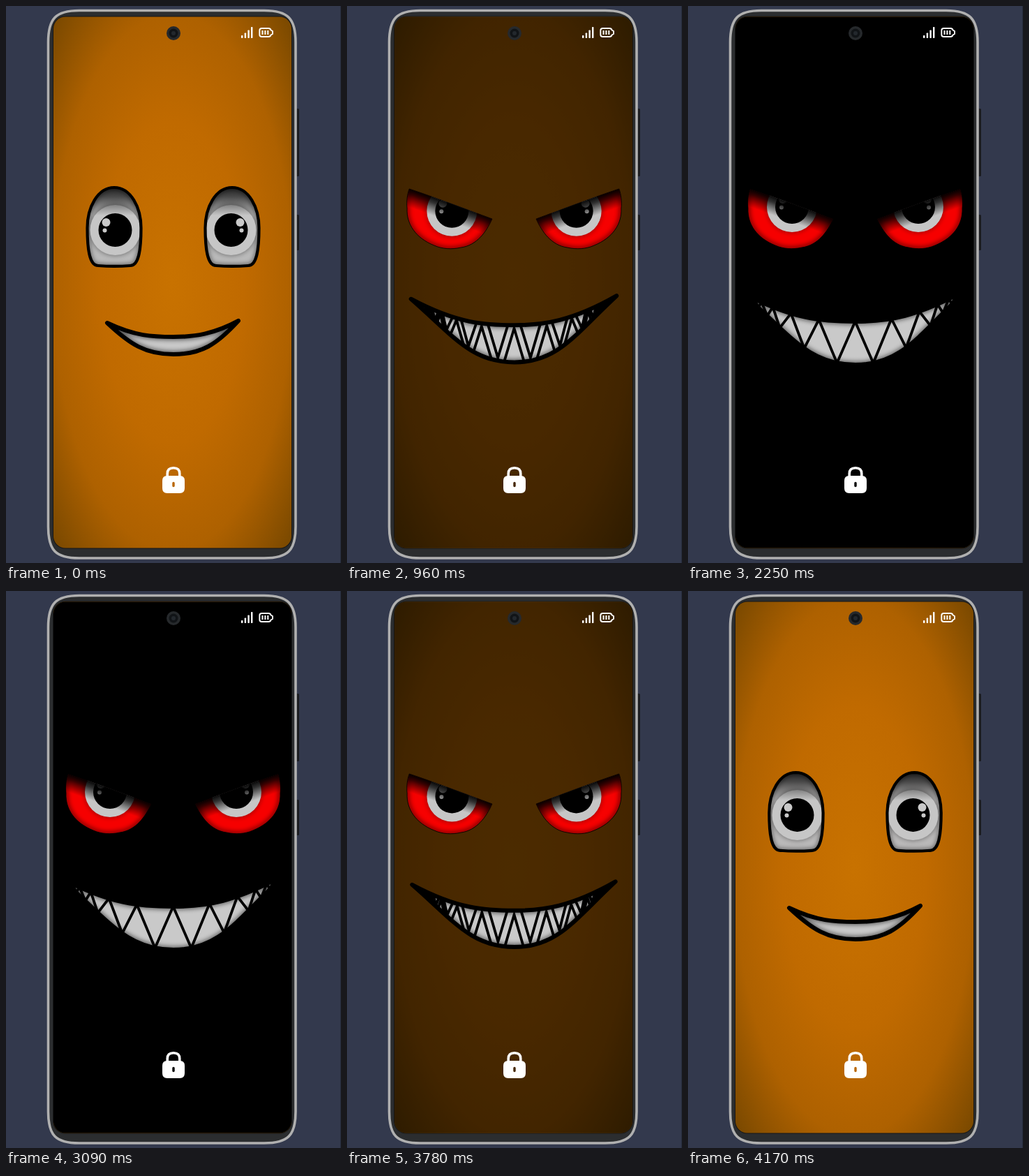
These frames come from a looping animation (480 px wide and 798 px high, 4200 ms). An HTML page:

```html
<!DOCTYPE html>
<html lang="en">
<head>
<meta charset="utf-8">
<title>Mood lock screen</title>
<style>
html, body { margin: 0; width: 100%; height: 100%; overflow: hidden; background: #33394d; }
svg { display: block; width: 100%; height: 100%; }
</style>
</head>
<body>
<svg viewBox="0 0 480 798">
  <defs>
    <radialGradient id="skin" r=".72">
      <stop offset="0" stop-color="#c87200"/>
      <stop offset=".42" stop-color="#c06a00"/>
      <stop offset=".7" stop-color="#ae6100"/>
      <stop offset="1" stop-color="#744600"/>
    </radialGradient>
    <linearGradient id="lid" gradientUnits="userSpaceOnUse">
      <stop offset="0"/>
      <stop offset=".35" stop-opacity=".75"/>
      <stop offset="1" stop-opacity="0"/>
    </linearGradient>
    <filter id="soft" x="-20%" y="-30%" width="140%" height="160%"><feGaussianBlur stdDeviation="3"/></filter>
    <clipPath id="screenClip"><rect x="68" y="15.5" width="341" height="761" rx="17"/></clipPath>
    <clipPath id="eyeClip"><path class="eyePath"/></clipPath>
    <clipPath id="mouthClip"><path class="mouthPath"/></clipPath>
  </defs>

  <rect width="480" height="798" fill="#33394d"/>
  <rect x="479" width="1" height="798" fill="#252a39"/>

  <g fill="#1b1c20">
    <rect x="414" y="147" width="6" height="97" rx="1.5"/>
    <rect x="414" y="299" width="6" height="51" rx="1.5"/>
  </g>
  <path d="M105 6.5H370C404 6.5 415 18 415 52V746C415 780 404 791 370 791H105C71 791 60.5 780 60.5 746V52C60.5 18 71 6.5 105 6.5Z" fill="#2b2d2f" stroke="#b0b0b0" stroke-width="3.6"/>
  <rect x="67" y="14.5" width="343" height="763" rx="18" fill="#161718"/>

  <g clip-path="url(#screenClip)">
    <rect x="68" y="15" width="341" height="762" fill="url(#skin)"/>
    <rect id="night" x="68" y="15" width="341" height="762"/>

    <g id="eye">
      <g clip-path="url(#eyeClip)">
        <path class="eyePath" id="sclera"/>
        <path class="eyePath" fill="none" stroke="#000" stroke-width="6" opacity=".5" filter="url(#soft)"/>
        <g id="pupil">
          <circle r="37" opacity=".35" filter="url(#soft)"/>
          <circle r="36" fill="#c6c6c6"/>
          <circle r="24"/>
          <circle cx="-13" cy="-11" r="6" fill="#cacaca"/>
          <circle cx="-15" cy="0.5" r="3" fill="#cacaca"/>
        </g>
        <path class="eyePath" id="shade" fill="url(#lid)"/>
      </g>
      <path class="eyePath" id="eyeLine" fill="none" stroke="#000" stroke-linejoin="round"/>
    </g>
    <use href="#eye" transform="matrix(-1 0 0 1 479 0)"/>

    <g clip-path="url(#mouthClip)">
      <path class="mouthPath" fill="#c9c9c9"/>
      <path class="mouthPath" fill="none" stroke="#000" stroke-width="9" opacity=".55" filter="url(#soft)"/>
      <path id="teeth" fill="none" stroke="#000" stroke-width="3.8"/>
    </g>
    <path class="mouthPath" fill="none" stroke="#000" stroke-width="6" stroke-linejoin="round"/>
  </g>

  <circle cx="240" cy="39" r="10" fill="#26292c"/>
  <circle cx="240" cy="39" r="6.5" fill="#111417"/>
  <circle cx="240" cy="39" r="3" fill="#23282d"/>

  <g fill="#fff">
    <rect x="337" y="42" width="2.4" height="4" rx=".8"/>
    <rect x="341.7" y="38.5" width="2.4" height="7.5" rx=".8"/>
    <rect x="346.4" y="34.5" width="2.4" height="11.5" rx=".8"/>
    <rect x="351" y="30" width="2.4" height="16" rx=".8"/>
    <path d="M366.5 32H376Q379 32 379.5 34.5L382 36V40L379.5 41.5Q379 44 376 44H366.5Q363.3 44 363.3 41V35Q363.3 32 366.5 32Z" fill="none" stroke="#fff" stroke-width="1.9" stroke-linejoin="round"/>
    <path d="M366.5 35h2v6h-2zM370.4 35h2v6h-2zM374.3 35h2v6h-2z"/>
    <path fill-rule="evenodd" d="M231 673H249Q256 673 256 680V691Q256 698 249 698H231Q224 698 224 691V680Q224 673 231 673ZM238.3 683.5V687.5Q238.3 689.3 240 689.3T241.7 687.5V683.5Q241.7 681.7 240 681.7T238.3 683.5Z"/>
    <path d="M231.2 675V670Q231.2 661.8 240 661.8T248.8 670V675" fill="none" stroke="#fff" stroke-width="3.6"/>
  </g>
</svg>

<script>
const LOOP = 4200, MORPH = 900, TURN_EVIL = 280, TURN_HAPPY = 3300;
const FADE = 580, FADE_OUT = 600, FADE_IN = 3560;

// Each outline is a start point followed by cubic segments.
const EYE = {
  happy: [155,260, 179,260,193.5,289,193.5,318, 193.5,346,191,372,178,372, 165,373,145,373,132,372,
          119,372,116.5,346,116.5,318, 116.5,289,131,260,155,260],
  evil:  [89,262, 125,274,170,291,208,305, 200,323,186,343,163,346, 150,349,136,348,125,343,
          98,332,85,312,86,290, 85,280,86,270,89,262]
};
const MOUTH = {
  happy: [145,454, 185,473,210,474,240,474, 270,474,298,470,333,451,
          302,485,280,499,240,499, 200,499,178,485,145,454],
  evil:  [75,409, 150,450,195,452,240,452, 285,452,330,446,403,404,
          335,465,310,514,240,514, 170,514,143,467,75,409]
};
const LID = { happy: [155,258,155,300], evil: [148,281,139,306] };
const HALF_TEETH = [0, 26, 52, 73, 92, 108, 118, 126, 134, 139, 144];
const TEETH = [...HALF_TEETH.slice(1).map(d => -d).reverse(), ...HALF_TEETH];

const $ = id => document.getElementById(id);
const all = name => document.querySelectorAll("." + name);
const clamp = v => Math.min(1, Math.max(0, v));
const mix = (a, b, k) => a + (b - a) * k;
const blend = (shape, k) => shape.happy.map((v, i) => mix(v, shape.evil[i], k));
const cubic = (a, b, c, d, s) =>
  (1 - s) ** 3 * a + 3 * (1 - s) ** 2 * s * b + 3 * (1 - s) * s * s * c + s ** 3 * d;

// Finds s in 0..1 where a monotonic f reaches the value.
function solve(f, value) {
  const rising = f(1) > f(0);
  let lo = 0, hi = 1;
  for (let i = 0; i < 20; i++) {
    const mid = (lo + hi) / 2;
    if ((f(mid) < value) === rising) lo = mid; else hi = mid;
  }
  return (lo + hi) / 2;
}

// Pulls back first, then swings over quickly.
function anticipate(u) {
  if (u <= 0) return 0;
  if (u >= 1) return 1;
  return cubic(0, -.5, 1, 1, solve(s => cubic(0, .7, .5, 1, s), u));
}

function toPath(pts) {
  const n = pts.map(v => v.toFixed(2));
  let d = `M${n[0]} ${n[1]}`;
  for (let i = 2; i < n.length; i += 6) d += `C${n.slice(i, i + 6).join(" ")}`;
  return d + "Z";
}

function edgeY(pts, x, upper) {
  const left = x < pts[6];
  const at = 6 * (upper ? (left ? 0 : 1) : (left ? 3 : 2));
  const axis = o => s => cubic(pts[at + o], pts[at + 2 + o], pts[at + 4 + o], pts[at + 6 + o], s);
  return axis(1)(solve(axis(0), x));
}

// Alternate teeth rise and hang; they start as thin spikes and widen until they interlock.
function teethPath(mouth, grow) {
  if (grow < .02) return "";
  const height = Math.min(1, grow * 1.2), width = grow ** 1.8;
  const scale = (mouth[12] - mouth[0]) / 328;
  const xs = TEETH.map(d => 239.5 + d * scale);
  let d = "";
  for (let i = 1; i < xs.length - 1; i++) {
    const hangs = i % 2 === 1, x = xs[i];
    const root = edgeY(mouth, x, hangs), far = edgeY(mouth, x, !hangs);
    const base = near => {
      const bx = mix(x, near, width);
      return `${bx} ${edgeY(mouth, bx, hangs)}`;
    };
    d += `M${base(xs[i - 1])}L${x} ${mix(root, far, height)}L${base(xs[i + 1])}`;
  }
  return d;
}

function setPaths(name, d) {
  all(name).forEach(el => el.setAttribute("d", d));
}

function render(t) {
  const mood = anticipate((t - TURN_EVIL) / MORPH) - anticipate((t - TURN_HAPPY) / MORPH);
  const dark = clamp((t - FADE_OUT) / FADE) - clamp((t - FADE_IN) / FADE);
  const lids = mood < 0 ? mood : 1 - (1 - Math.min(1, mood)) ** 3.34;
  const grin = Math.sign(mood) * Math.abs(mood) ** 1.4;

  $("night").setAttribute("opacity", dark);

  setPaths("eyePath", toPath(blend(EYE, lids)));
  const red = clamp(lids), gray = mix(186, 0, red);
  $("sclera").setAttribute("fill", `rgb(${mix(186, 246, red)},${gray},${gray})`);
  $("shade").setAttribute("opacity", mix(.82, 1, red));
  $("eyeLine").setAttribute("stroke-width", mix(4.2, .8, red));
  $("pupil").setAttribute("transform", `translate(${mix(156.5, 149, mood)} ${mix(321, 288, mood)})`);
  blend(LID, lids).forEach((v, i) => $("lid").setAttribute(["x1", "y1", "x2", "y2"][i], v));

  const mouth = blend(MOUTH, grin);
  setPaths("mouthPath", toPath(mouth));
  $("teeth").setAttribute("d", teethPath(mouth, clamp(grin)));
}

const start = performance.now();
function tick() {
  render((performance.now() - start) % LOOP);
  requestAnimationFrame(tick);
}
tick();
</script>
</body>
</html>
```
